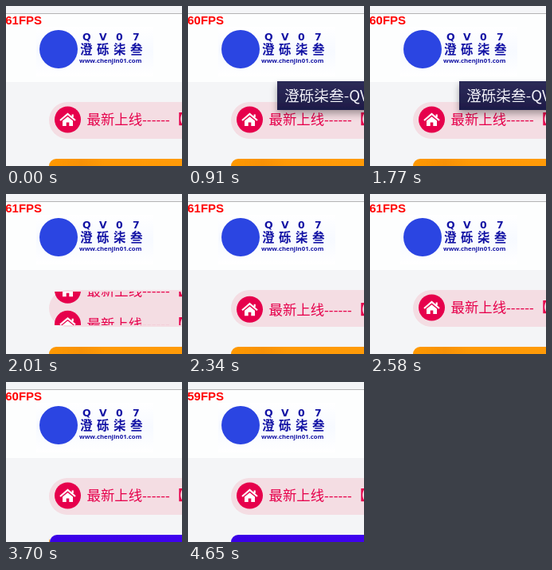
These frames come from a looping animation (221x200 px, 4.87 s). An HTML page:

```html
<!DOCTYPE html>
<html lang="zh-CN">
<head>
<meta charset="utf-8">
<title>Notice</title>
<style>
html, body { margin: 0; width: 221px; height: 200px; overflow: hidden; background: #f4f5f7; }
svg { display: block; }
text { white-space: pre; }
.cjk { font-family: "Liberation Sans", "Noto Sans CJK SC", "Noto Sans CJK", sans-serif; }
#fps { font: bold 15px "Liberation Sans", sans-serif; fill: #f00; }
.brand { fill: #1212a4; font-weight: bold; }
.notice { font-size: 17.4px; fill: #e6004c; }
.tip { font: 18.7px "Noto Sans CJK SC", "Noto Sans CJK", sans-serif; fill: #f2f2fa; }
</style>
</head>
<body>
<svg width="221" height="200" viewBox="0 0 221 200">
  <defs>
    <linearGradient id="sheen" x2="0" y2="1">
      <stop stop-color="#fff"/><stop offset=".5" stop-color="#f7faff"/><stop offset="1" stop-color="#fff"/>
    </linearGradient>
    <linearGradient id="orange">
      <stop stop-color="#ff9900"/><stop offset=".08" stop-color="#f89206"/>
      <stop offset=".14" stop-color="#ff9a06"/><stop offset="1" stop-color="#ff9c0c"/>
    </linearGradient>
    <linearGradient id="violet">
      <stop stop-color="#3a00e6"/><stop offset="1" stop-color="#4a08ff"/>
    </linearGradient>
    <linearGradient id="navy" x2="0" y2="1">
      <stop stop-color="#2c2b58"/><stop offset="1" stop-color="#1e1c48"/>
    </linearGradient>
    <filter id="shadow" x="-20%" y="-50%" width="140%" height="220%">
      <feDropShadow dx="0" dy="5" stdDeviation="4" flood-color="#000" flood-opacity=".32"/>
    </filter>
    <clipPath id="window"><rect x="54" y="122" width="167" height="42"/></clipPath>
    <clipPath id="stage"><rect x="54" y="191" width="167" height="9"/></clipPath>
  </defs>

  <rect width="221" height="200" fill="#f4f5f7"/>
  <rect y="9" width="221" height="1" fill="#b4b4b4"/>
  <rect y="10" width="221" height="85" fill="#fdfefe"/>
  <text id="fps" x="-.8" y="23"></text>

  <rect x="38" y="26" width="147" height="62" fill="url(#sheen)"/>
  <circle cx="66" cy="54" r="24" fill="#2b45e2"/>
  <text class="brand" x="96 117 138 159" y="43" font-family="DejaVu Sans, sans-serif" font-size="12.5">QV07</text>
  <text class="brand cjk" x="93 114 135 156" y="59.5" font-size="15.5">澄砾柒叁</text>
  <text class="brand" x="92" y="70.5" font-family="Noto Sans, sans-serif" font-size="7.8">www.chenjin01.com</text>

  <rect x="54" y="120" width="300" height="46" rx="23" fill="#f4dde3"/>
  <g clip-path="url(#window)">
    <g id="roll">
      <g id="item">
        <circle cx="77.5" cy="142" r="16.5" fill="#e6004c"/>
        <path d="M68 143 77.5 135 87 143M83.700 135.500V139" fill="none" stroke="#fff" stroke-width="2.200"/>
        <path d="M71 143.500 77.500 138.200 84 143.500V150H79.300V145.500H75.700V150H71Z" fill="#fff"/>
        <text class="notice cjk" x="101.500" y="148.300">最新上线------【</text>
      </g>
      <use href="#item" y="42"/>
    </g>
  </g>

  <g clip-path="url(#stage)">
    <g id="slides">
      <rect x="54" y="191" width="500" height="200" rx="9" fill="url(#orange)"/>
      <rect x="554" y="191" width="500" height="200" rx="9" fill="url(#violet)"/>
    </g>
  </g>

  <g id="tip">
    <rect x="112" y="94" width="150" height="36" fill="url(#navy)" filter="url(#shadow)"/>
    <text class="tip" x="121" y="118.500">澄砾柒叁-QV07</text>
  </g>
</svg>
<script>
const LOOP = 4870, ROW = 42, SLIDE = 500;
const $ = id => document.getElementById(id);
const clamp = v => Math.min(1, Math.max(0, v));
const span = (t, from, to) => clamp((t - from) / (to - from));

// The CSS "ease" curve, cubic-bezier(.25, .1, .25, 1)
const bezier = (u, a, b) => 3 * u * (1 - u) * ((1 - u) * a + u * b) + u ** 3;
function ease(x) {
  let lo = 0, hi = 1;
  for (let i = 0; i < 24; i++) {
    const mid = (lo + hi) / 2;
    if (bezier(mid, .25, .25) < x) lo = mid; else hi = mid;
  }
  return x >= 1 ? 1 : x <= 0 ? 0 : bezier(lo, .1, 1);
}

const rates = [[0, 61], [910, 60], [1840, 61], [2760, 56], [3700, 60], [4650, 59]];
// Tooltip: shown at, starts fading, gone
const tips = [[40, 910, 1280], [1590, 1770, 1990]];

function draw() {
  const t = performance.now() % LOOP;
  $('fps').textContent = rates.filter(r => r[0] <= t).pop()[1] + 'FPS';
  const tip = tips.find(([on, , off]) => t >= on && t < off);
  $('tip').setAttribute('opacity', tip ? 1 - span(t, tip[1], tip[2]) : 0);
  $('roll').setAttribute('transform', `translate(0 ${-ROW * ease(span(t, 1770, 2570))})`);
  $('slides').setAttribute('transform', `translate(${-SLIDE * ease(span(t, 3110, 3740))})`);
  requestAnimationFrame(draw);
}
draw();
</script>
</body>
</html>
```
